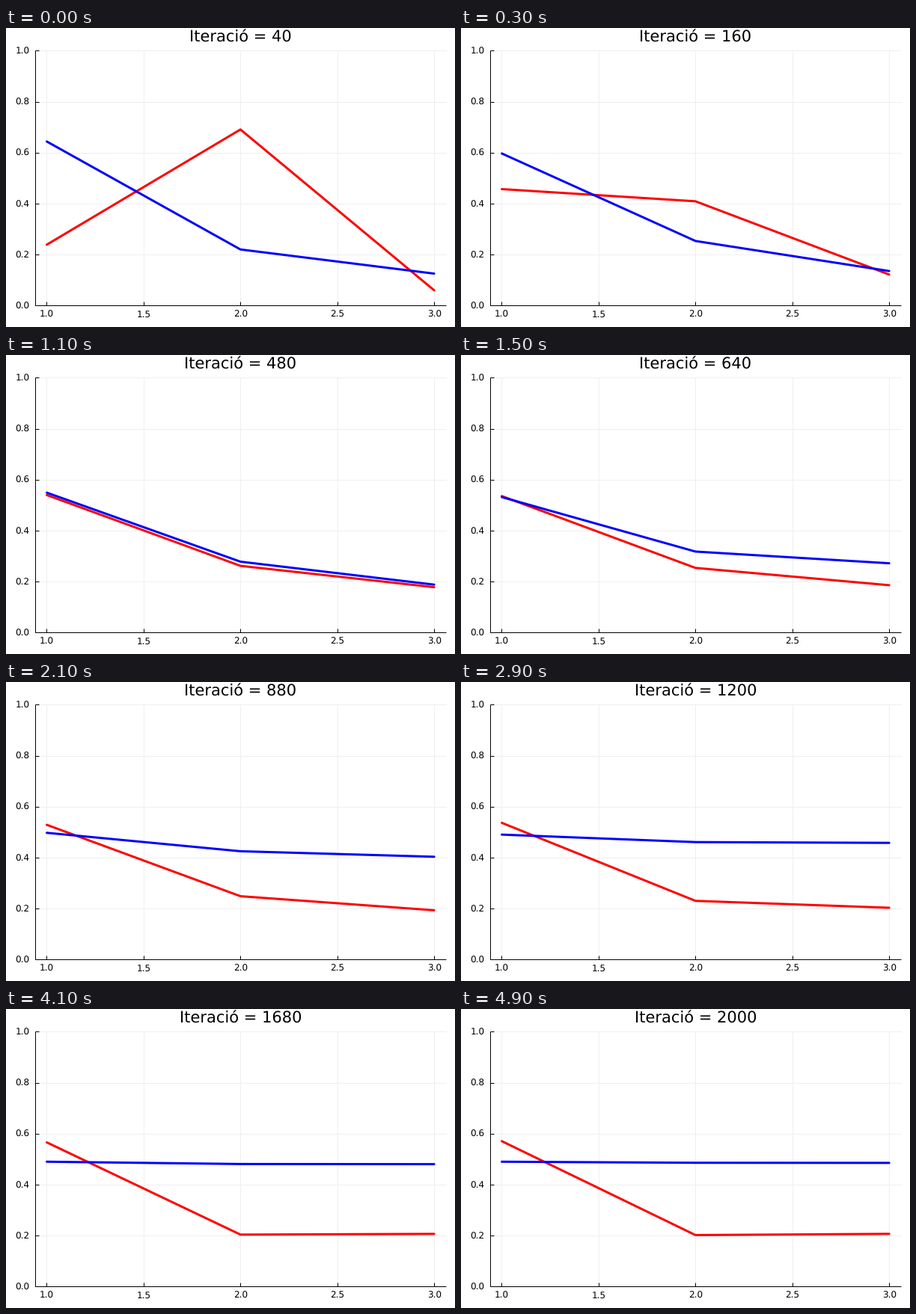
Write a matplotlib script that moves like this. It is 600 by 400 pixels and loops after 5 s.

```python
from math import cos, exp, pi

import numpy as np
import matplotlib.pyplot as plt
from matplotlib.animation import FuncAnimation

WIDTH, HEIGHT, DPI = 600, 400, 100
FRAMES, INTERVAL, STEP = 50, 100, 40
PT = 72 / DPI  # points per pixel
LEFT, RIGHT, TOP, BOTTOM = 38.9, 587.7, 30.4, 371.4
GRID = "#efefef"

plt.rcParams.update({"font.family": "DejaVu Sans", "text.hinting": "none",
                     "text.hinting_factor": 1})


def settle(t, start, level, rate):
    """Exponential approach from start to level."""
    return level + (start - level) * exp(-rate * t)


def shift(t, size, centre, width):
    """Smooth step of the given size."""
    return size / (1 + exp((centre - t) / width))


def red(t):
    second = settle(t, 0.691, 0.252, 0.342) + shift(t, -0.050, 30, 3.5)
    third = settle(t, 0.060, 0.190, 0.215) + shift(t, 0.017, 24, 3.5)
    total = 0.977 + 0.013 * cos(2 * pi * t / 55) * exp(-t / 40)
    return total - second - third, second, third


def blue(t):
    drift = shift(t, 0.063, 27, 7)
    return (settle(t, 0.644, 0.540, 0.2) + shift(t, -0.050, 17, 2),
            settle(t, 0.219, 0.2655, 0.4) + shift(t, 0.160, 17, 2) + drift,
            settle(t, 0.123, 0.135, 0.3) + shift(t, 0.290, 15.7, 2.9) + drift)


def px(x):
    return LEFT + (x - 0.94) / 2.12 * (RIGHT - LEFT)


def py(y):
    return BOTTOM - y * (BOTTOM - TOP)


fig = plt.figure(figsize=(WIDTH / DPI, HEIGHT / DPI), dpi=DPI, facecolor="white")
ax = fig.add_axes([0, 0, 1, 1])
ax.set(xlim=(0, WIDTH), ylim=(HEIGHT, 0))
ax.axis("off")


def stroke(xs, ys, color="black", width=1, **style):
    return ax.plot(xs, ys, color=color, lw=width * PT, **style)[0]


def label(x, y, text, size, align="center"):
    return ax.text(x, y, text, fontsize=size * PT, ha=align, va="baseline")


axis_style = dict(zorder=3, solid_capstyle="butt", solid_joinstyle="miter")
for value in np.linspace(1, 3, 5):
    x = px(value)
    stroke([x, x], [TOP, BOTTOM], GRID)
    stroke([x, x], [BOTTOM, BOTTOM - 5], **axis_style)
    label(x, 387.2, f"{value:.1f}", 12)
for value in np.linspace(0, 1, 6):
    y = py(value)
    stroke([LEFT, RIGHT], [y, y], GRID)
    stroke([LEFT, LEFT + 5], [y, y], **axis_style)
    label(31.5, y + 4.4, f"{value:.1f}", 12, "right")
stroke([LEFT, LEFT, RIGHT], [TOP, BOTTOM, BOTTOM], **axis_style)

title = label((LEFT + RIGHT) / 2, 18.6, "", 20.8)
xs = px(np.array([1, 2, 3]))
curves = [(stroke(xs, xs, color, 3, zorder=4, solid_capstyle="round",
                  solid_joinstyle="round"), weights)
          for color, weights in (("#ff0000", red), ("#0000ff", blue))]


def update(frame):
    title.set_text(f"Iteració = {STEP * (frame + 1)}")
    for line, weights in curves:
        line.set_ydata(py(np.array(weights(frame))))
    return [title] + [line for line, _ in curves]


anim = FuncAnimation(fig, update, frames=FRAMES, interval=INTERVAL,
                     repeat=True, repeat_delay=0)
plt.show()
```
